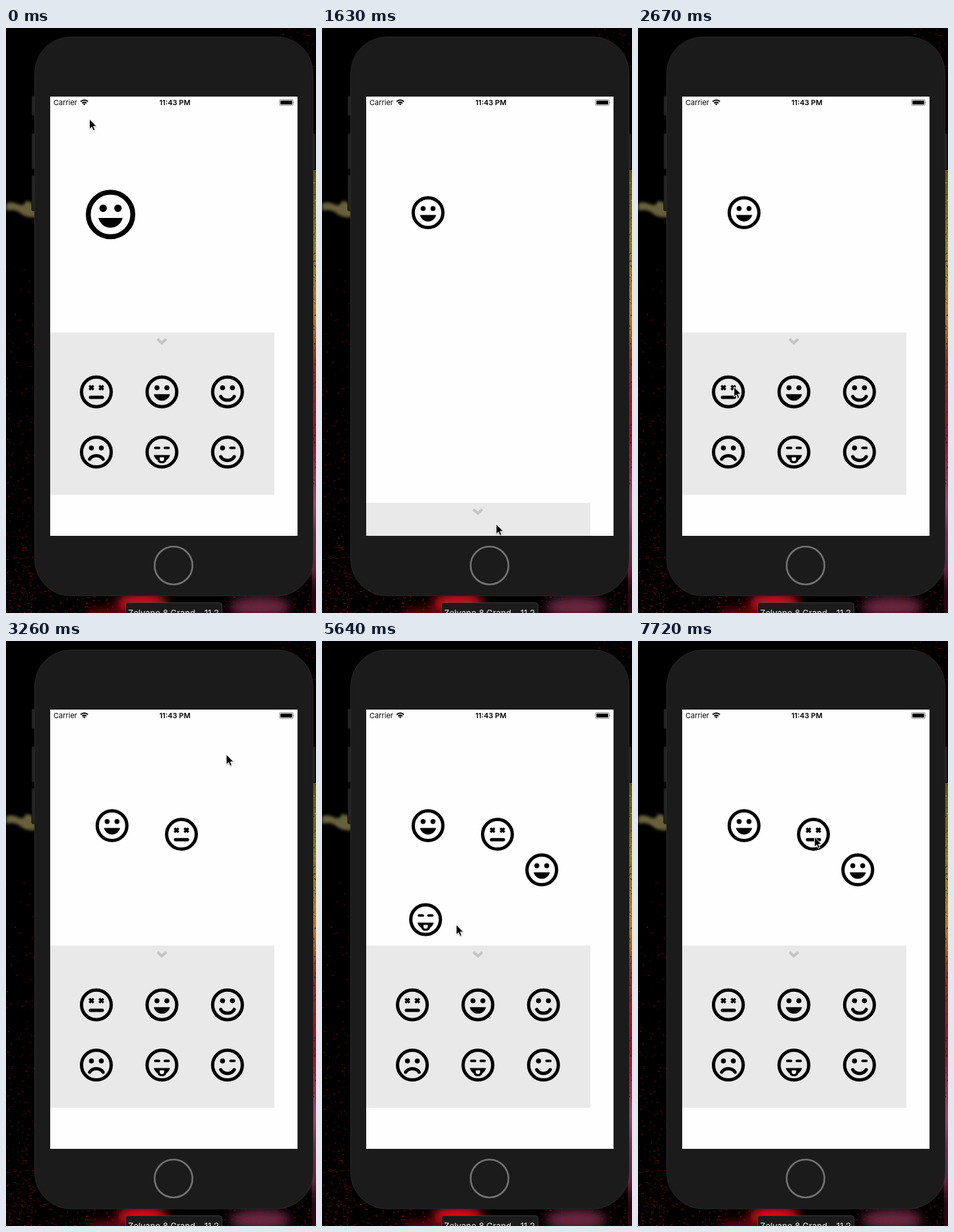
These frames come from a looping animation (470x887 px, 8000 ms). An HTML page:

```html
<!DOCTYPE html>
<html lang="en">
<head>
<meta charset="utf-8">
<title>Emoji tray</title>
<style>
html, body { margin: 0; width: 100%; height: 100%; overflow: hidden; background: #000; }
svg { display: block; width: 100%; height: 100%; }
text { font-family: Inter, Roboto, sans-serif; }
.line { fill: none; stroke: #000; stroke-linecap: round; }
.mouth { stroke-width: 5; }
</style>
</head>
<body>
<svg viewBox="0 0 470 887">
  <defs>
    <filter id="soft" x="-50%" y="-50%" width="200%" height="200%"><feGaussianBlur stdDeviation="8"/></filter>
    <filter id="fine" x="-50%" y="-50%" width="200%" height="200%"><feGaussianBlur stdDeviation="2"/></filter>
    <filter id="shade" x="-50%" y="-50%" width="200%" height="200%"><feGaussianBlur stdDeviation="1"/></filter>
    <linearGradient id="edge" x1="0" y1="0" x2="0" y2="1">
      <stop offset="0" stop-color="#5c5a0a"/>
      <stop offset=".15" stop-color="#8a7a10"/>
      <stop offset=".33" stop-color="#c8780e"/>
      <stop offset=".43" stop-color="#a02a10"/>
      <stop offset=".6" stop-color="#b80826"/>
      <stop offset=".75" stop-color="#a04468"/>
      <stop offset=".86" stop-color="#7c2c4a"/>
      <stop offset=".95" stop-color="#2c0610"/>
    </linearGradient>
    <clipPath id="screen"><rect x="67" y="104" width="375" height="666"/></clipPath>

    <circle id="ring" r="22.5" class="line" stroke-width="5"/>
    <circle id="dot" r="3.75" cy="-6.3"/>
    <path id="dash" class="line" stroke-width="3.7" d="M-2.9 -6.3H2.9"/>
    <path id="cross" class="line" style="stroke-linecap:butt" stroke-width="3.5" d="M-3.1-9.4l6.2 6.2m0-6.2l-6.2 6.2"/>
    <path id="smile" class="line mouth" d="M-10.2 7C-6 14.5 6 14.5 10.2 7"/>
    <g id="eyes"><use href="#ring"/><use href="#dot" x="-7.5"/><use href="#dot" x="7.5"/></g>

    <g id="dead"><use href="#ring"/><use href="#cross" x="-7.5"/><use href="#cross" x="7.5"/>
      <path class="line mouth" d="M-9 8.2H9"/></g>
    <g id="grin"><use href="#eyes"/>
      <path d="M-12.3 3.6H12.3C10.5 9.8 6 13.4 0 13.4S-10.5 9.8-12.3 3.6z"/></g>
    <g id="happy"><use href="#eyes"/><use href="#smile"/></g>
    <g id="sad"><use href="#eyes"/><path class="line mouth" d="M-10.2 10.8C-6 3.6 6 3.6 10.2 10.8"/></g>
    <g id="tongue"><use href="#ring"/><use href="#dash" x="-7.2"/><use href="#dash" x="7.2"/>
      <path d="M-12.3 4.6H12.3C11.2 8.6 9 11.2 6.6 12.4C6 15.4 3.6 16.8 0 16.8S-6 15.4-6.6 12.4C-9 11.2-11.2 8.6-12.3 4.6z"/>
      <path fill="#f2f2f2" d="M-3.3 8H3.3V10.4A3.3 3.3 0 0 1-3.3 10.4z"/></g>
    <g id="wink"><use href="#ring"/><use href="#dot" x="-7.5"/><use href="#dash" x="7.5"/><use href="#smile"/></g>
  </defs>

  <rect width="470" height="887"/>
  <g id="sky">
    <rect x="464" y="215" width="6" height="672" fill="url(#edge)"/>
    <path d="M0 266Q8 262 18 267T30 262L45 266V287Q30 288 22 281T0 277z" fill="#67603a" filter="url(#fine)"/>
    <g filter="url(#soft)">
      <ellipse cx="458" cy="790" rx="16" ry="40" fill="#6e2742"/>
      <ellipse cx="385" cy="878" rx="46" ry="16" fill="#6a2840"/>
      <ellipse cx="206" cy="872" rx="38" ry="15" fill="#d80a1c"/>
      <ellipse cx="150" cy="892" rx="30" ry="12" fill="#700410"/>
    </g>
  </g>

  <g fill="#242424" stroke="#0c0c0c">
    <rect x="39" y="103" width="8" height="30" rx="1.5"/>
    <rect x="39" y="160" width="8" height="54" rx="1.5"/>
    <rect x="39" y="223" width="8" height="54" rx="1.5"/>
    <rect x="462" y="160" width="7" height="54" rx="1.5"/>
  </g>
  <rect x="43.5" y="13.5" width="422" height="847.5" rx="55" fill="#1b1b1b" stroke="#272727"/>
  <circle cx="254" cy="815" r="28.7" fill="none" stroke="#747474" stroke-width="2.6"/>
  <rect x="67" y="104" width="375" height="666" fill="#fefefe"/>

  <text x="72" y="117.3" font-size="11">Carrier</text>
  <text x="256" y="117.3" font-size="11" font-weight="600" text-anchor="middle">11:43 PM</text>
  <g fill="none" stroke="#000" stroke-width="2">
    <path d="M113.2 111.6Q118.7 106.8 124.2 111.6M115.4 114Q118.7 111.2 122 114"/>
    <path d="M116.8 115.2L118.7 117.3L120.6 115.2Q118.7 113.8 116.8 115.2z" fill="#000" stroke="none"/>
  </g>
  <rect x="414.5" y="108.5" width="21" height="9" rx="2" fill="none" stroke="#888"/>
  <rect x="416" y="110" width="18" height="6" rx=".8"/>
  <path d="M436.4 111.4q1.6 1.7 0 3.4z" fill="#888"/>

  <g clip-path="url(#screen)">
    <g id="tray">
      <rect x="67" width="340" height="246" fill="#e9e9e9"/>
      <path d="M229.6 9.8L236.3 16L243 9.8" fill="none" stroke="#c5c5c5" stroke-width="4.2"/>
    </g>
    <g id="stage"></g>
  </g>

  <rect x="181.5" y="871.5" width="146" height="30" rx="4" fill="#1b1b1b" stroke="#3c3c3c"/>
  <text x="254" y="891.5" font-size="13" fill="#e4e4e4" text-anchor="middle">Zelvano 8 Grand – 11.2</text>

  <g id="cursor">
    <path d="M0 1V16.5L3.6 13.2L6 18.6L8.6 17.4L6.2 12.2H11z" opacity=".35" filter="url(#shade)"/>
    <path d="M0 0V15.4L3.5 12.1L5.8 17.5L8.4 16.4L6.1 11.1H10.9z" stroke="#fff"/>
  </g>
</svg>
<script>
const LOOP = 8000, STEP = 148.5, LAST = 52, TOP = 461.7, BIG = 1.5;
const $ = id => document.getElementById(id);
const ease = f => (1 - Math.cos(Math.PI * f)) / 2;

function add(parent, tag, attrs) {
  const el = document.createElementNS('http://www.w3.org/2000/svg', tag);
  for (const k in attrs) el.setAttribute(k, attrs[k]);
  return parent.appendChild(el);
}
const place = (el, x, y, s = 1) => el.setAttribute('transform', `translate(${x} ${y}) scale(${s})`);

const names = ['dead', 'grin', 'happy', 'sad', 'tongue', 'wink'];
const slot = i => [137 + 99.4 * (i % 3), 90 + 91.3 * Math.floor(i / 3)];
names.forEach((name, i) => place(add($('tray'), 'use', { href: '#' + name }), ...slot(i)));

let seed = 7;
const rnd = () => (seed = seed * 16807 % 2147483647) / 2147483647;

// Star dust; `lean` above 1 crowds the dots towards the bottom.
function dust(count, fill, x, y, w, h, lean = 1) {
  let d = '';
  for (let i = 0; i < count; i++) {
    const s = (.5 + rnd()).toFixed(1), px = x + w * rnd(), py = y + h * rnd() ** (1 / lean);
    d += `M${px.toFixed(1)} ${py.toFixed(1)}h${s}v${s}h-${s}z`;
  }
  add($('sky'), 'path', { d, fill });
}
dust(260, '#8c0a14', 0, 290, 44, 597, 2.5);
dust(220, '#a80c16', 0, 830, 181, 57);
dust(70, '#7a0810', 395, 0, 75, 60);
dust(160, '#8e0c1c', 328, 840, 142, 47);
dust(120, '#2a1604', 464, 215, 6, 480);
dust(60, '#d8a020', 464, 215, 6, 260);

// Moves are [depart, arrive, ...target] in steps; between them things rest.
function glide(from, moves, n) {
  let pos = from;
  for (const [t0, t1, ...to] of moves) {
    if (n <= t0) break;
    const f = ease(Math.min(1, (n - t0) / (t1 - t0)));
    pos = pos.map((v, i) => v + (to[i] - v) * f);
  }
  return pos;
}

const trayTop = n => glide([TOP], [[3, 6, 720], [11, 15.02, TOP]], n)[0];

const pointer = n => glide([126.5, 138], [
  [0, 6, 183.3, 748],
  [8, 11, 264, 752], [11, 15, 264, 502],
  [15, 18, 145.5, 544], [18, 21, 274.5, 285.4],
  [21, 22, 334, 172], [22, 24, 246, 546], [24, 27, 342.8, 341.4],
  [27, 28, 397.5, 238], [28, 31, 282, 290],
  [31, 34, 244, 637], [34, 37, 164.7, 416.5], [37, 38, 203.5, 430],
  [39, 41, 165, 422], [42, 44, 240, 532],
  [44, 47, 320, 355], [48, 52, 267.5, 297]
], n);

// A copy pulled from the tray keeps its offset to the pointer until dropped.
function pulled(name, grab, drop) {
  const [x, y] = slot(names.indexOf(name)), [gx, gy] = pointer(grab);
  return n => {
    const [px, py] = pointer(Math.min(n, drop));
    return [x + px - gx, TOP + y + py - gy];
  };
}

const copies = [
  { name: 'grin', start: 0, shrink: 1, pos: n => glide([158.5, 282.7], [[0, 1, 160.8, 280]], n) },
  { name: 'dead', start: 19, shrink: 22, pos: pulled('dead', 18, 21) },
  { name: 'grin', start: 25, shrink: 29, pos: pulled('grin', 24, 27) },
  { name: 'tongue', start: 35, shrink: 38, end: 42, pos: pulled('tongue', 34, 37) }
];
for (const c of copies) c.el = add($('stage'), 'use', { href: '#' + c.name });

function draw(ms) {
  const n = Math.min(LAST, Math.floor(ms / STEP + .07));
  place($('tray'), 0, trayTop(n));
  place($('cursor'), ...pointer(n));
  for (const { el, start, shrink, end = Infinity, pos } of copies) {
    el.style.display = n >= start && n < end ? '' : 'none';
    place(el, ...pos(n), n < shrink ? BIG : 1);
  }
}

const t0 = performance.now();
(function tick() {
  draw((performance.now() - t0) % LOOP);
  requestAnimationFrame(tick);
})();
</script>
</body>
</html>
```
